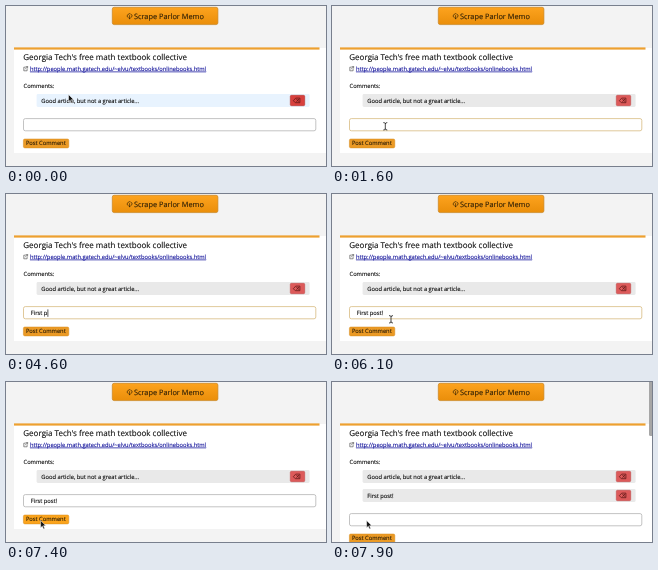
Write an HTML page that moves like this. It is 320 px wide and 160 px high and loops after 8 s.

```html
<!DOCTYPE html>
<html lang="en">
<head>
<meta charset="utf-8">
<title>Post a comment</title>
<style>
  html, body { margin: 0; width: 100%; height: 100%; overflow: hidden; background: #f3f3f3; }
  svg { display: block; width: 100vw; height: 100vh; }
  text {
    font: 5.75px "Open Sans", "Noto Sans", sans-serif;
    color: #0c0c0c;
    fill: currentColor;
    stroke: currentColor;
    stroke-width: .12;
    white-space: pre;
    text-rendering: geometricPrecision;
  }
  .title { font-size: 8px; }
  .scrape { font-size: 7.38px; color: #2b1d06; }
  .link { color: #12129a; }
  .label { color: #2b1d06; }
  .row { --red: #dd5a5a; --edge: #c04c4c; }
  .row.hover { --red: #d8403d; --edge: #b23330; }
  .bar { fill: #e9e9e9; }
  .hover .bar { fill: #e8f3fe; }
  .del { fill: var(--red); stroke: var(--edge); stroke-width: .6; }
  .field { fill: #fff; stroke: #b4b4b4; stroke-width: .8; }
  .field.focus { stroke: #d8bc82; }
  .post { fill: #eb9a25; stroke: #d58a1c; stroke-width: .5; }
  .post.hover { fill: #fba41c; }
  .line { fill: none; stroke-linecap: round; stroke-linejoin: round; }
</style>
</head>
<body>
<svg viewBox="0 0 320 160" preserveAspectRatio="none">
  <defs>
    <linearGradient id="amber" x1="0" y1="0" x2="0" y2="1">
      <stop offset="0" stop-color="#fda31e"/>
      <stop offset="1" stop-color="#ea8e0a"/>
    </linearGradient>
    <g id="delete">
      <rect class="del" x="284.3" y="89.3" width="14.4" height="10.4" rx="1.2"/>
      <path class="line" d="M287.6 94.4l2.1-2.3h4.2v4.6h-4.2zM290.7 93.3l2 2.2m0-2.2l-2 2.2" stroke="#5c1614" stroke-width=".75"/>
    </g>
  </defs>

  <rect x="106.3" y="1.3" width="105.6" height="17.3" rx="1.8" fill="url(#amber)" stroke="#c98420" stroke-width=".7"/>
  <path class="line" d="M121.9 11.2a1.2 1.2 0 0 1 .1-2.3a1.6 1.6 0 0 1 3-.4a1.4 1.4 0 0 1 .2 2.7M123.6 9.6v3.2m-.9-.9l.9.9l.9-.9" stroke="#2b1d06" stroke-width=".65"/>
  <text class="scrape" x="127.9" y="12.6">Scrape Parlor Memo</text>

  <rect id="panel" x="8" y="42" width="312" height="105" fill="#fff"/>
  <rect x="8" y="41.4" width="305.5" height="2.2" fill="#eda02f"/>
  <text class="title" x="17.3" y="53.8">Georgia Tech's free math textbook collective</text>
  <path class="line" d="M19.3 61.2h-1.5v3.6h3.3v-1.5M19.4 63l2.1-2.3m-1.4-.1h1.5v1.5" stroke="#444" stroke-width=".6"/>
  <text class="link" x="24" y="64.6" text-decoration="underline">http://people.math.gatech.edu/~elvu/textbooks/onlinebooks.html</text>
  <text x="17.5" y="81.6">Comments:</text>

  <g class="row" id="first">
    <rect class="bar" x="30.6" y="88" width="273" height="13" rx="1.4"/>
    <text x="35.3" y="96.6">Good article, but not a great article...</text>
    <use href="#delete"/>
  </g>
  <g class="row" id="added" transform="translate(0 19)">
    <rect class="bar" x="30.6" y="88" width="273" height="13" rx="1.4"/>
    <text x="35.3" y="96.6">First post!</text>
    <use href="#delete"/>
  </g>

  <g id="form">
    <rect class="field" id="field" x="17.5" y="112.6" width="292.3" height="12.2" rx="1.8"/>
    <text id="typed" x="24.8" y="121.3"></text>
    <rect id="caret" y="115.4" width=".7" height="7.4" fill="#111"/>
    <rect class="post" id="post" x="17.4" y="133" width="45.4" height="8.9" rx="1.4"/>
    <text class="label" x="19.9" y="139.2">Post Comment</text>
  </g>

  <rect id="scrollbar" x="317" y="-2" width="4" height="56" rx="1.5" fill="#a6a6a6"/>

  <path id="arrow" d="M0 0v7.2l1.7-1.5l1.2 2.7l1.2-.5l-1.2-2.7h2.3z" fill="#111" stroke="#fff" stroke-width=".5"/>
  <path id="beam" class="line" d="M-1.6-3.4q1.6 0 1.6 1v5.4q0 1-1.6 1M1.6-3.4q-1.6 0-1.6 1m0 5.4q0 1 1.6 1" stroke="#1a1a1a" stroke-width=".8"/>
</svg>
<script>
const LOOP = 8000, STEP = 100;
const MESSAGE = "First post!";
const KEYS = [2300, 2500, 2700, 2800, 3100, 4000, 4500, 4800, 4900, 5000, 5100];
const CARET = [[1000, 1300], [1800, 3600], [4000, 5500]];
const FOCUS = [1000, 7300], HIDDEN = [2300, 6000], POSTED = 7500;
const MOUSE = [
  [0, 62.5, 88.5], [200, 62, 92], [500, 59, 106], [900, 54.5, 118.5], [1100, 53.3, 120],
  [6000, 53.3, 120], [6100, 59, 125], [6300, 58, 133], [6600, 47, 141], [6900, 37, 140], [7100, 34.6, 138.5]
];

const $ = id => document.getElementById(id);
const show = (el, on) => el.setAttribute("visibility", on ? "visible" : "hidden");
const within = (v, [a, b]) => v >= a && v < b;

function mouseAt(t) {
  const i = MOUSE.findIndex(p => p[0] > t);
  if (i < 0) return MOUSE[MOUSE.length - 1].slice(1);
  const [t0, x0, y0] = MOUSE[i - 1], [t1, x1, y1] = MOUSE[i];
  const k = (t - t0) / (t1 - t0);
  return [x0 + (x1 - x0) * k, y0 + (y1 - y0) * k];
}

function draw(t) {
  const posted = t >= POSTED;
  const [x, y] = mouseAt(t);
  const overField = !posted && within(y, [112, 125.5]);
  const visible = !within(t, HIDDEN);

  $("first").classList.toggle("hover", within(y, [88, 101]));
  $("field").classList.toggle("focus", within(t, FOCUS));
  $("post").classList.toggle("hover", !posted && within(x, [17, 63]) && within(y, [133, 142]));

  const count = KEYS.filter(k => k <= t).length;
  $("typed").textContent = posted ? "" : MESSAGE.slice(0, count);
  $("caret").setAttribute("x", 25 + $("typed").getComputedTextLength());
  show($("caret"), CARET.some(span => within(t, span)));

  show($("added"), posted);
  show($("scrollbar"), posted);
  $("form").setAttribute("transform", `translate(0 ${posted ? 19 : 0})`);
  $("panel").setAttribute("height", posted ? 124 : 105);

  for (const id of ["arrow", "beam"]) {
    $(id).setAttribute("transform", `translate(${x} ${y})`);
    show($(id), visible && (id === "beam") === overField);
  }
}

const start = performance.now();
function tick() {
  const t = (performance.now() - start) % LOOP;
  draw(Math.floor(t / STEP) * STEP);
  requestAnimationFrame(tick);
}
tick();
</script>
</body>
</html>
```
